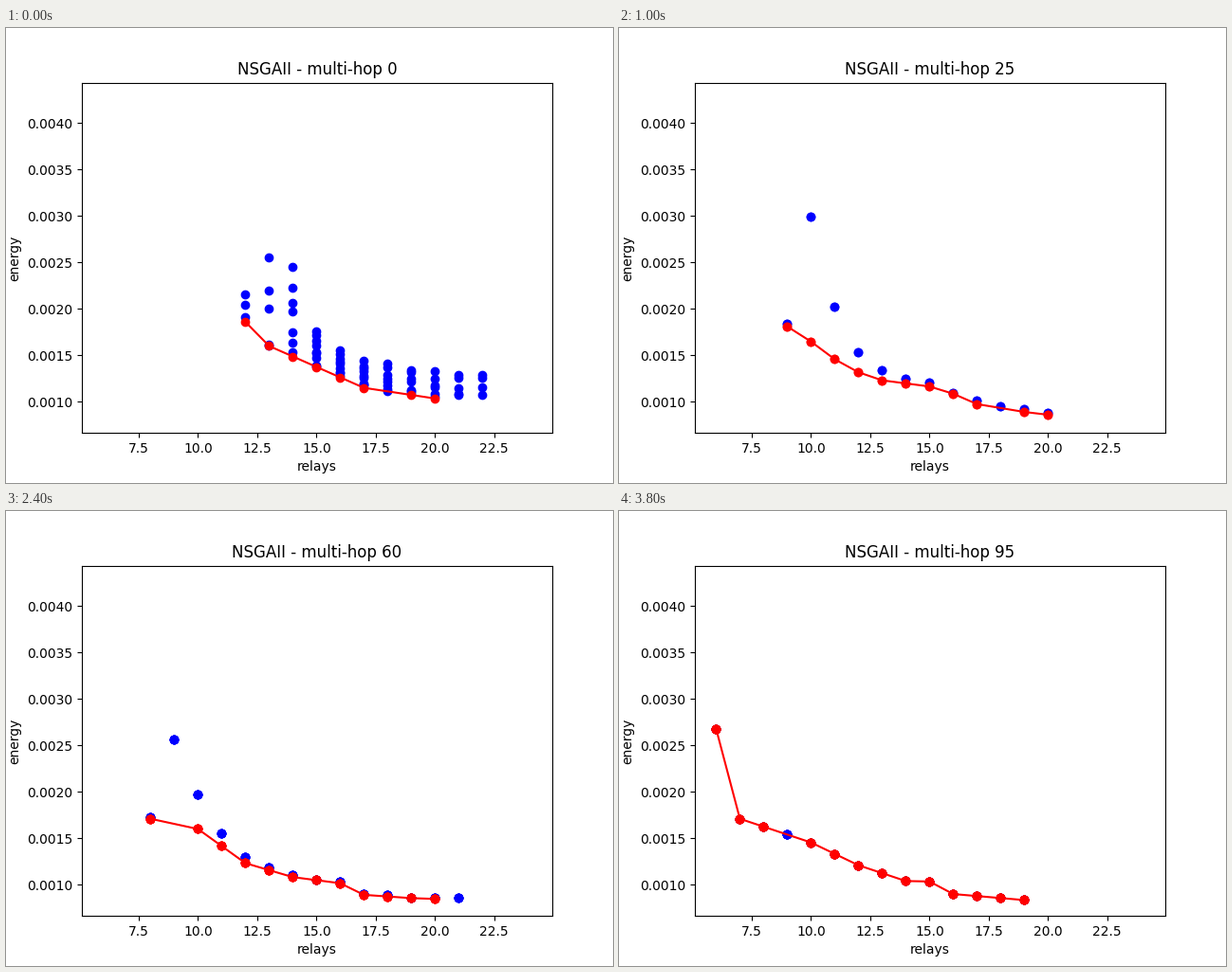
A matplotlib script for the animation above (4 s loop, 640 px wide and 480 px high).

```python
import matplotlib.pyplot as plt
import numpy as np
from matplotlib.animation import FuncAnimation

FRAMES, STEP_MS, GENS = 20, 200, 5
UNIT = 1e-5  # energies below are in this unit

# key points (relays, energy) of the best front at a few steps
KNOTS = {
    0: [(12, 186), (13, 160), (17, 115), (20, 103.5), (22, 107)],
    3: [(9, 191), (11, 148), (13, 125), (15, 123.5), (17, 104), (20, 86),
        (22, 90)],
    7: [(9, 171), (10, 160), (12, 127), (16, 103.5), (17, 91), (19, 86)],
    15: [(8, 171), (10, 160), (12, 121), (14, 104), (16, 100.5), (17, 88),
         (20, 84)],
    19: [(6, 267.5), (7, 171), (10, 145.5), (12, 121), (14, 104),
         (15, 103.5), (16, 90), (19, 83.5)],
}


def relay_range(step):
    lo = np.interp(step, [0, 1, 3, 8, 9, 15, 17], [12, 10, 9, 9, 8, 8, 6])
    hi = np.interp(step, [0, 2, 3, 7, 10, 13, 15, 16],
                   [22, 24, 22, 19, 19, 22, 21, 19])
    return np.arange(round(lo), round(hi) + 1)


def best_energy(step, xs):
    """Front energy, mixed from the key fronts before and after."""
    a = max(s for s in KNOTS if s <= step)
    b = min(s for s in KNOTS if s >= step)
    part = (step - a) / max(b - a, 1)
    old, new = (np.interp(xs, *zip(*KNOTS[s])) for s in (a, b))
    return old + (new - old) * part


def pareto(xs, ys, gap):
    """Points that beat all to their left; one relay count stays empty."""
    front, best = [], np.inf
    for x, y in zip(xs, ys):
        if x != gap and y < best:
            front.append((x, y * UNIT))
            best = y
    return np.array(front)


def dominated(step, xs, ys):
    rng = np.random.default_rng(4)
    cloud = max(0, 1 - step / 3)
    peak = np.interp(step, [0, 3, 7, 10, 15, 19], [0, 22, 244, 143, 6, 0])
    noise = 5 * (1 - step / (FRAMES - 1))
    points = []
    for x, y in zip(xs, ys):
        # wide random start that collapses onto the front
        n = min(8, 2 * (x - 11), 25 - x) if cloud else 0
        spread = cloud * (30 + 90 * np.exp(-(x - 13.5) ** 2))
        points += [(x, y + spread * (k + rng.random()) / n) for k in range(n)]
        # stragglers at the low relay counts
        extra = peak * 0.4 ** (x - xs[0] - 1) if x > xs[0] else 0
        points.append((x, y + extra + rng.random() * noise))
    return np.array(points) * (1, UNIT)


fig, ax = plt.subplots(figsize=(6.4, 4.8), dpi=100)
ax.set_xlim(5.1, 24.95)
ax.set_ylim(66.4 * UNIT, 443.6 * UNIT)
ax.set_autoscale_on(False)
ax.set_xlabel("relays")
ax.set_ylabel("energy")
title = ax.set_title("")
everyone = ax.scatter([], [], color="blue", zorder=2)
line, = ax.plot([], [], color="red", zorder=3)
elite = ax.scatter([], [], color="red", zorder=4)


def draw(step):
    xs = relay_range(step)
    ys = best_energy(step, xs)
    front = pareto(xs, ys, gap=18 if step < 10 else 9)
    copies = 1 + step // 3  # converged populations hold duplicates
    everyone.set_offsets(np.tile(dominated(step, xs, ys), (copies, 1)))
    elite.set_offsets(np.tile(front, (copies, 1)))
    line.set_data(front[:, 0], front[:, 1])
    title.set_text(f"NSGAII - multi-hop {step * GENS}")
    return everyone, line, elite, title


anim = FuncAnimation(fig, draw, frames=FRAMES, interval=STEP_MS,
                     repeat=True, repeat_delay=0, blit=False)
plt.show()
```
